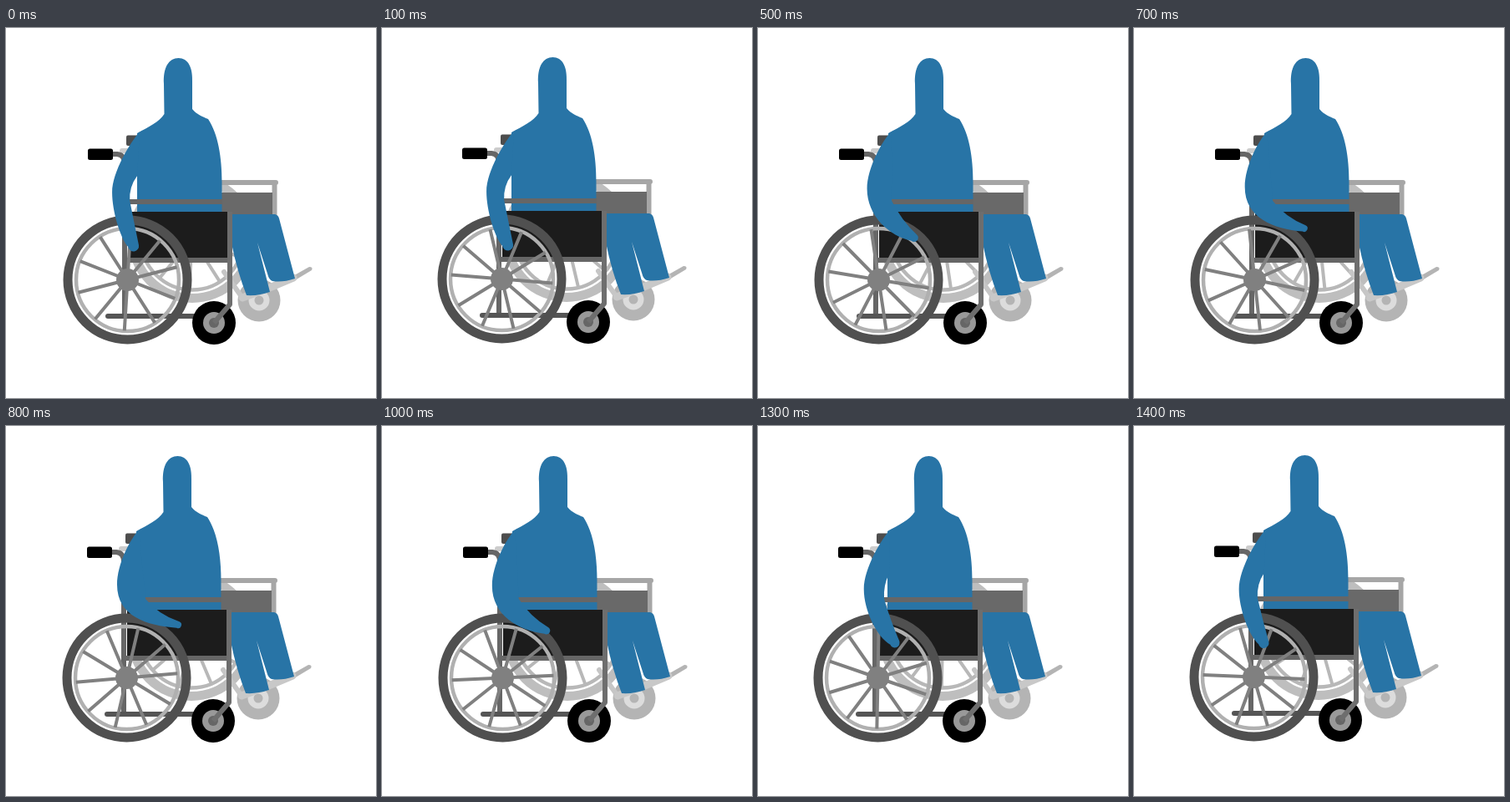
An HTML page for the animation above (1500 ms loop, 443 px wide and 443 px high).

```html
<!DOCTYPE html>
<html lang="en">
<head>
<meta charset="utf-8">
<title>Wheelchair push</title>
<style>
  html, body { margin: 0; height: 100%; overflow: hidden; background: #fff; }
  svg { display: block; width: 100vw; height: 100vh; }
</style>
</head>
<body>
<svg viewBox="0 0 443 443" fill="none">
  <g id="scene">
    <!-- far side of the chair -->
    <g transform="translate(223 252)" stroke="#b8b8b8">
      <circle r="71.5" stroke="#bebebe" stroke-width="11"/>
      <circle r="61.5" stroke-width="4.5"/>
      <path class="spokes" stroke-width="4"/>
    </g>
    <path d="M139 147H150" stroke="#ccc" stroke-width="6" stroke-linecap="round"/>
    <rect x="144" y="128.5" width="16" height="12.5" rx="2" fill="#4d4d4d"/>
    <circle cx="303" cy="326" r="25.5" fill="#b4b4b4"/>
    <circle cx="303" cy="326" r="12.5" fill="#dcdcdc"/>
    <circle cx="303" cy="326" r="5.5" fill="#b4b4b4"/>
    <path d="M261 292L283 323" stroke="#c6c6c6" stroke-width="6" stroke-linecap="round"/>
    <path d="M340 299L363 286Q368 286 366 290L346 302Z" fill="#b4b4b4"/>
    <path d="M283 323L318 310L344 299" stroke="#c8c8c8" stroke-width="9" stroke-linecap="round"/>
    <path d="M256 185H323M321.5 185V224" stroke="#a6a6a6" stroke-width="6" stroke-linecap="round"/>
    <rect x="257" y="197" width="62" height="26" fill="#696969"/>

    <!-- frame posts behind the body -->
    <path d="M127 151H133Q142 152 142 162V345" stroke="#666" stroke-width="6"/>
    <path d="M122 345H224" stroke="#555" stroke-width="6" stroke-linecap="round"/>
    <rect x="98" y="144.5" width="30" height="13.5" rx="2.5" fill="#000"/>

    <!-- legs and torso -->
    <g fill="#2874a6">
      <path d="M270 223H322Q326 224 327 228L346 300Q331 305 319 303Q315 302 313 294L301 257L316 316Q302 321 288 320Q277 292 270 258Z"/>
      <path d="M157 221V126C170 119 184 112 189.5 103L189 67C188 47 195 36 206.500 36S224 47 223 66V97C229 104 235 106 242 109C254 127 258.500 155 258.500 185V221Z"/>
    </g>

    <!-- near side of the chair -->
    <rect x="146" y="220" width="120" height="56" fill="#1c1c1c"/>
    <path d="M147 208H259M143 278H270" stroke="#666" stroke-width="6"/>
    <circle cx="249" cy="353" r="26" fill="#000"/>
    <circle cx="249" cy="353" r="13" fill="#999"/>
    <circle cx="249" cy="353" r="6" fill="#666"/>
    <path d="M268 220V331L249 353" stroke="#6e6e6e" stroke-width="6" stroke-linejoin="round"/>
    <g transform="translate(145.5 301.5)">
      <circle r="61.5" stroke="#b0b0b0" stroke-width="4.5"/>
      <path class="spokes" stroke="#808080" stroke-width="4"/>
      <circle r="71.5" stroke="#505050" stroke-width="11"/>
      <circle r="13.5" fill="#808080"/>
    </g>
    <path id="arm" fill="#2874a6"/>
  </g>
</svg>
<script>
const STEP = 100, STEPS = 15, SPOKES = 10;
const TURN = 288; // eight spoke gaps per loop, so the wheel closes seamlessly

const scene = document.getElementById('scene');
const arm = document.getElementById('arm');
const wheels = document.querySelectorAll('.spokes');
const mix = (a, b, u) => a + (b - a) * u;

const spokes = Array.from({ length: SPOKES }, (_, i) => {
  const a = i * 2 * Math.PI / SPOKES;
  return `M0 0L${61 * Math.cos(a)} ${61 * Math.sin(a)}`;
}).join('');
wheels.forEach(w => w.setAttribute('d', spokes));

// push: 0 = hand back at the rim, 1 = hand fully forward
function armPath(push) {
  const ex = mix(127, 134, push), ey = mix(197, 190, push);   // elbow
  const hx = mix(152, 207, push), hy = 261 - 23 * push ** 2;  // hand
  const ix = mix(148, 168, push), iy = 207;                   // inside of the elbow
  const pit = mix(157, 165, push);
  const r = mix(6.5, 4, push), tilt = mix(0.15, 1.15, push);
  const rx = r * Math.cos(tilt), ry = r * Math.sin(tilt);
  const ox = hx - rx, oy = hy + ry, nx = hx + rx, ny = hy - ry;
  return `M160 124.5C150 135 ${ex} ${ey - 25} ${ex} ${ey}`
    + `C${ex} ${ey + mix(22, 38, push)} ${(ex + ox) / 2} ${mix(oy, ey, mix(0.17, 0.05, push))} ${ox} ${oy}`
    + `A${r} ${r} 0 0 0 ${nx} ${ny}`
    + `Q${(ix + nx) / 2 - 5 * push} ${(iy + ny) / 2 + 5 * push} ${ix} ${iy}`
    + `Q${ix - 1} 190 ${pit} 177Z`;
}

function draw() {
  const step = Math.floor(performance.now() / STEP) % STEPS;
  const push = 0.5 - 0.5 * Math.cos((step - 0.5) / STEPS * 2 * Math.PI);
  const angle = 21.5 + TURN * step / STEPS;
  // the chair jolts back once it starts and settles as the arm reaches forward
  const jolt = Math.sign(step);
  const dx = jolt * Math.round(push - 2), dy = jolt * Math.round(push - 0.7);

  scene.setAttribute('transform', `translate(${dx} ${dy})`);
  wheels.forEach(w => w.setAttribute('transform', `rotate(${angle})`));
  arm.setAttribute('d', armPath(push));
  requestAnimationFrame(draw);
}
draw();
</script>
</body>
</html>
```
